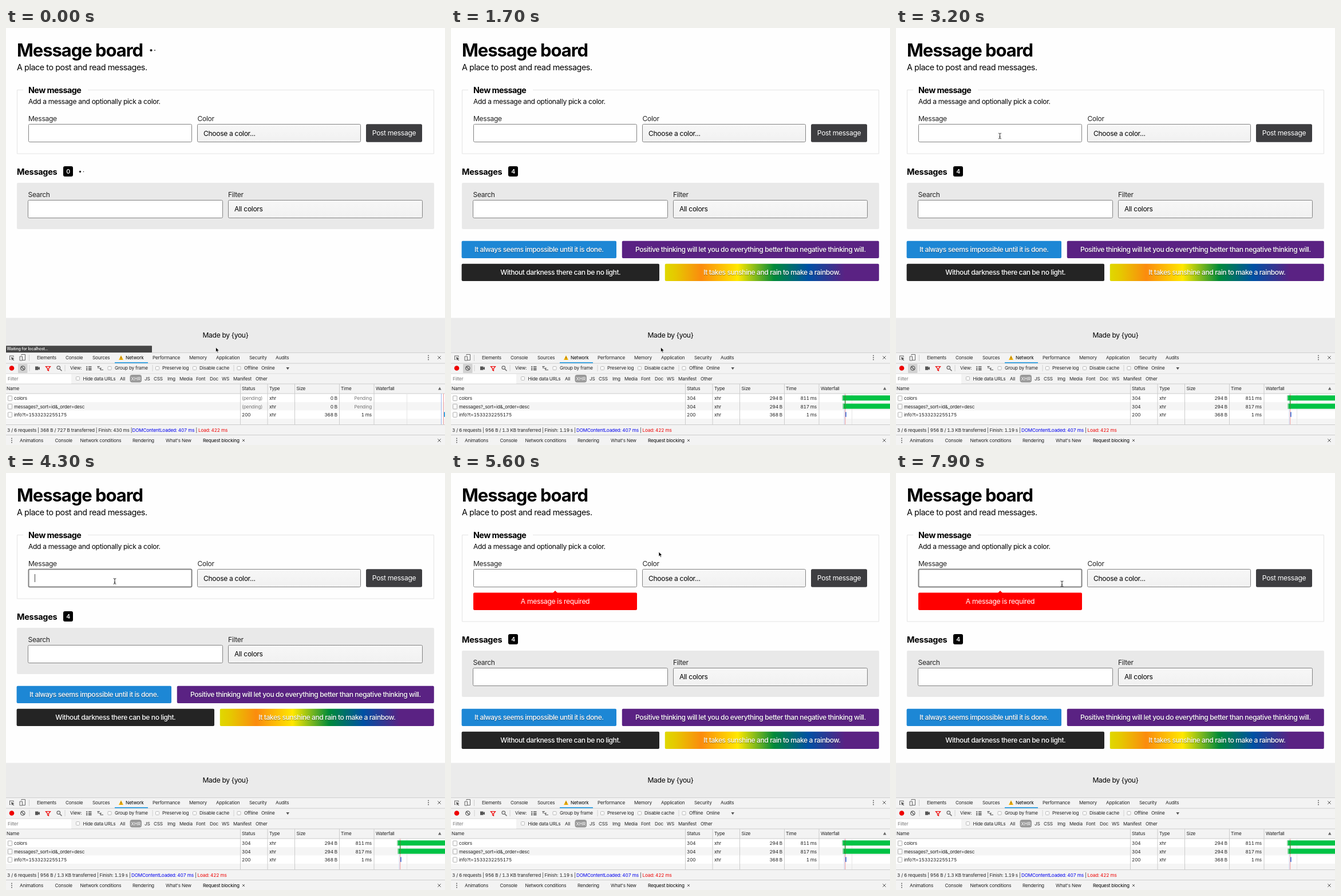
An HTML page that plays this animation: 767 by 730 pixels, repeating every 8000 ms.

```html
<!DOCTYPE html>
<html lang="en">
<head>
<meta charset="utf-8">
<title>Message board</title>
<style>
  html, body { margin: 0; width: 100%; height: 100%; overflow: hidden; background: #fefefe; }
  svg { display: block; width: 767px; height: 730px; }
  text { font-family: Inter, "Open Sans", sans-serif; font-optical-sizing: none; font-size: 12.1px; letter-spacing: -.027em; fill: #000; white-space: pre; }
  .label { fill: #222; }
  .chip { fill: #fff; font-weight: 500; letter-spacing: -.036em; text-shadow: 0 1px 1px rgba(0, 0, 0, .4); }
  .dev { font-size: 8.2px; letter-spacing: -.022em; font-variant-numeric: tabular-nums; fill: #222; }
  .white { fill: #fff; }
  .gray { fill: #777; }
  .dark { fill: #000; }
  .hide { display: none; }
</style>
</head>
<body>
<svg id="stage" viewBox="0 0 767 730" xmlns="http://www.w3.org/2000/svg"></svg>
<script>
const LOOP = 8000, STEP = 100;
const LOADED = 700, FOCUS_1 = 3900, BLUR = 5500, FOCUS_2 = 7200;

// Pointer stops: time, x, y
const PATH = [
  [0, 366.5, 559], [2100, 366.5, 559], [2900, 181.5, 189], [3300, 181.5, 189],
  [3700, 190, 189.5], [4600, 190, 189.5], [5200, 363, 138], [5900, 363, 138],
  [6600, 290, 194], [LOOP, 290, 194]
];

// Markup helpers
const rect = (x, y, w, h, fill, more = '') => `<rect x="${x}" y="${y}" width="${w}" height="${h}" fill="${fill}" ${more}/>`;
const text = (x, y, s, cls = '', more = '') => `<text x="${x}" y="${y}" class="${cls}" ${more}>${s.replace(/&/g, '&amp;')}</text>`;
const dev = (x, y, s, cls = '', more = '') => text(x, y, s, 'dev ' + cls, more);
const mid = (x, y, s, cls = '') => text(x, y, s, cls, 'text-anchor="middle"');
const line = (d, color, width = 1, more = '') => `<path d="${d}" fill="none" stroke="${color}" stroke-width="${width}" ${more}/>`;
const shape = (d, fill, more = '') => `<path d="${d}" fill="${fill}" ${more}/>`;
const dot = (x, y, r, fill, more = '') => `<circle cx="${x}" cy="${y}" r="${r}" fill="${fill}" ${more}/>`;
const group = (id, body, cls = '') => `<g id="${id}" class="${cls}">${body}</g>`;
const field = (x, y, w, fill = '#fff', id = '') => rect(x, y, w, 31, fill, `rx="2" stroke="#828282" ${id && `id="${id}"`}`);
const check = (x, y) => rect(x - 3, y - 3, 6, 6, '#fdfdfd', 'rx="1" stroke="#aaa" stroke-width=".8"');
const cross = (x, y, r = 2.7) => line(`M${x - r} ${y - r}l${2 * r} ${2 * r}m0 ${-2 * r}l${-2 * r} ${2 * r}`, '#555');
const kebab = (x, y) => [-3.5, 0, 3.5].map(d => dot(x, y + d, .9, '#555')).join('');
const hline = (y, color = '#ccc') => line(`M0 ${y}H767`, color);
const labels = (y, list) => list.map(([x, s]) => dev(x, y, s)).join('');
const loader = (x, y, gap, name) => [0, 1, 2].map(i => dot(x + i * gap, y, 0, '#222', `class="${name}"`)).join('');

function boardTop() {
  return text(19, 50, 'Message board', '', 'style="font-size:31px;font-weight:700;letter-spacing:-.034em"')
    + text(19, 74, 'A place to post and read messages.', '', 'style="font-size:14.3px;letter-spacing:-.029em"')
    + line('', '#e4e4e4', 1, 'id="frame"')
    + text(39, 114, 'New message', '', 'style="font-size:14.3px;font-weight:700;letter-spacing:-.038em"')
    + text(39, 132.7, 'Add a message and optionally pick a color.')
    + text(39, 163, 'Message', 'label') + text(334.5, 163, 'Color', 'label')
    + field(39.5, 168.5, 285, '#fff', 'entry')
    + line('M50.5 177V191', '#444', 1, 'id="caret"')
    + field(334.5, 168.5, 285, 'url(#soft)') + text(345, 188.5, 'Choose a color...')
    + rect(629, 168.3, 98, 31.4, '#3d3d40', 'rx="2.5"') + mid(678, 188.3, 'Post message', 'white')
    + group('error', shape('M177.5 210.5L182 206L186.5 210.5Z', '#f00')
      + rect(39, 209.5, 286, 30.5, '#f00', 'rx="2"') + mid(182, 229.3, 'A message is required', 'white'));
}

function chip(x, y, w, fill, s) {
  return rect(x, y, w, 30.2, fill, 'rx="2"') + mid(x + w / 2, y + 19.2, s, 'chip');
}

function boardList() {
  return text(19, 256.7, 'Messages', '', 'style="font-size:14.5px;font-weight:700;letter-spacing:-.02em"')
    + rect(100, 242, 17, 18, '#000', 'rx="3"')
    + '<text id="count" x="108.5" y="254.8" class="white" text-anchor="middle" style="font-size:10.5px;font-weight:600"></text>'
    + rect(19, 271, 729, 81, '#e9e9e9', 'rx="2"')
    + text(38.5, 295.7, 'Search', 'label') + text(388, 295.7, 'Filter', 'label')
    + field(38.5, 301.5, 340) + field(388.5, 301.5, 339, 'url(#soft)') + text(399, 321.4, 'All colors')
    + group('chips', chip(18.6, 372.7, 270.4, '#1d87d5', 'It always seems impossible until it is done.')
      + chip(298.8, 372.7, 449, '#5a2283', 'Positive thinking will let you do everything better than negative thinking will.')
      + chip(18.6, 412.7, 345.4, '#242424', 'Without darkness there can be no light.')
      + chip(373.8, 412.7, 374, 'url(#rainbow)', 'It takes sunshine and rain to make a rainbow.'));
}

function tabs() {
  return rect(0, 568, 767, 162, '#f3f3f3') + hline(568.5, '#d0d0d0') + hline(587, '#ccc')
    + shape('M6 573.5H13.5V576H12.5V574.5H7V580H8V581H6Z', '#666') + shape('M9 576L14.5 578.2L12.2 579.3L14.2 581.4L13.3 582.2L11.3 580.2L10.2 582Z', '#555')
    + line('M27 573V571.5H33.5V581.5H29', '#666') + line('M24 575H28.5V582H24Z', '#666') + line('M40.5 572V583', '#ccc')
    + labels(580.3, [[54, 'Elements'], [104, 'Console'], [151, 'Sources'], [256, 'Performance'], [320, 'Memory'], [367, 'Application'], [425, 'Security'], [471, 'Audits']])
    + shape('M201 573L205 581H197Z', '#f4b400') + line('M201 575.5V578M201 579V580', '#533', .9)
    + dev(209, 580.3, 'Network', 'dark') + rect(190, 585, 58, 1.8, '#2f9fe0')
    + kebab(738, 577) + cross(757, 577);
}

function tools() {
  const seps = [41, 103, 256, 398].map(x => `M${x} 590V601`).join('');
  return hline(605, '#ddd') + hline(623, '#ccc') + line(seps, '#d0d0d0')
    + dot(10, 595.5, 4.3, '#e00')
    + rect(21, 588, 16.5, 16, '#d2d2d2', 'id="held" rx="1"')
    + dot(29.3, 595.5, 3.7, 'none', 'stroke="#555" stroke-width="1.2"') + line('M26.8 593L31.8 598', '#555', 1.2)
    + shape('M51 592.5H56.5V594.5L59 593V598.5L56.5 597V598.8H51Z', '#555')
    + line('M69.5 592.5H77.5L74.5 596V600L72.5 598.8V596Z', '#e00', 1.2)
    + dot(91.8, 594.6, 2.8, 'none', 'stroke="#666" stroke-width="1.2"') + line('M94 597L97.5 600.3', '#666', 1.5)
    + dev(112, 598.4, 'View:')
    + line('M140 593H142.5M140 595.7H142.5M140 598.4H142.5M144 593H149.5M144 595.7H149.5M144 598.4H149.5', '#555', 1.6)
    + line('M159.5 592.5H164M162.5 595.5H167M165.5 598.5H170M161 592V596M165 595V599', '#555', 1.2)
    + [181, 264.5, 329.5, 407].map(x => check(x, 595.5)).join('')
    + labels(598.4, [[190, 'Group by frame'], [273, 'Preserve log'], [338, 'Disable cache'], [416, 'Offline'], [446, 'Online']])
    + shape('M489.5 594H495L492.2 598.2Z', '#555')
    + rect(0, 606, 114, 16.5, '#fff') + dev(3, 617, 'Filter', 'gray') + check(125.5, 613.5)
    + rect(216.5, 607, 20.5, 13.5, '#999', 'rx="4"') + dev(226.8, 616.8, 'XHR', 'white', 'text-anchor="middle"')
    + labels(616.8, [[134.5, 'Hide data URLs'], [199, 'All'], [242, 'JS'], [258, 'CSS'], [282, 'Img'], [303, 'Media'], [332, 'Font'], [356, 'Doc'], [377, 'WS'], [397, 'Manifest'], [436, 'Other']]);
}

function cells(rows) {
  return rows.map(([status, size, time], i) => {
    const y = 651.2 + i * 14.4, tone = status === '(pending)' ? 'gray' : '';
    return dev(412, y, status, tone) + dev(460, y, 'xhr')
      + dev(579, y, size, '', 'text-anchor="end"') + dev(639, y, time, tone, 'text-anchor="end"');
  }).join('');
}

function summary(head, x, load, sep) {
  return dev(2, 707, head) + dev(x, 707, 'DOMContentLoaded: 407 ms', '', 'style="fill:#00e"')
    + dev(sep, 707, '|') + dev(load, 707, 'Load: 422 ms', '', 'style="fill:#e00"');
}

function table() {
  const names = ['colors', 'messages?_sort=id&_order=desc', 'info?t=1533232255175'];
  const info = ['200', '368 B', '1 ms'], wait = ['(pending)', '0 B', 'Pending'];
  return rect(0, 640, 767, 54, '#fff') + rect(0, 655, 767, 14.4, '#f5f5f5') + rect(0, 684, 767, 10, '#f5f5f5')
    + hline(640, '#ccc')
    + labels(634, [[1, 'Name'], [412, 'Status'], [460, 'Type'], [507.5, 'Size'], [585, 'Time'], [646, 'Waterfall']])
    + shape('M755 633.5H760.5L757.8 628.5Z', '#666')
    + line([409.5, 457, 504.5, 582.5, 643].map(x => `M${x} 623V694`).join(''), '#ccc')
    + line('M700.5 640V694', '#e6e6e6')
    + names.map((s, i) => rect(3.5, 644 + i * 14.4, 7, 8.5, '#fff', 'rx=".8" stroke="#999" stroke-width=".8"') + dev(14, 651.2 + i * 14.4, s)).join('')
    + group('pending', cells([wait, wait, info])
      + line('M760.5 640V694', '#9db8f0') + line('M764.5 640V694', '#f09a9a') + rect(765.3, 672.3, 2, 8.5, '#1a9be0')
      + summary('3 / 6 requests | 368 B / 727 B transferred | Finish: 430 ms |', 220.5, 336, 331.5))
    + group('done', cells([['304', '294 B', '811 ms'], ['304', '294 B', '817 ms'], info])
      + line('M687 640V694', '#c8d4f4') + line('M688.7 640V694', '#f3b4b4', 1.4)
      + rect(683.5, 643.2, 84, 9, '#00c345') + rect(684.5, 657.6, 83, 9, '#00c345')
      + rect(683.5, 643.2, 1.5, 9, '#9ccfa8') + rect(684.5, 657.6, 1.5, 9, '#9ccfa8')
      + line('M688.7 643V667', '#3e9a3a', 1.4) + rect(689, 672.3, 1.7, 8.5, '#3f6fd8')
      + summary('3 / 6 requests | 956 B / 1.3 KB transferred | Finish: 1.19 s |', 219, 334.5, 330))
    + hline(694.5, '#ccc') + hline(712.5, '#ccc');
}

function drawer() {
  return kebab(10, 722)
    + labels(725.3, [[24, 'Animations'], [85.5, 'Console'], [129.5, 'Network conditions'], [221, 'Rendering'], [279, "What's New"]])
    + dev(344, 725.3, 'Request blocking', 'dark') + cross(415, 722, 2) + cross(757, 722);
}

const stops = [[0, '#dfd800'], [.05, '#e6c800'], [.17, '#fb8b0e'], [.34, '#ffe800'], [.51, '#008a3a'], [.67, '#0050a4'], [.84, '#5a2283']];
const stage = document.getElementById('stage');
stage.innerHTML = `<defs>
  <linearGradient id="rainbow">${stops.map(([o, c]) => `<stop offset="${o}" stop-color="${c}"/>`).join('')}</linearGradient>
  <linearGradient id="soft" x2="0" y2="1"><stop stop-color="#f7f7f7"/><stop offset="1" stop-color="#f1f1f1"/></linearGradient>
  </defs>`
  + rect(0, 0, 767, 730, '#fefefe') + rect(0, 507.5, 767, 61, '#ebebeb')
  + mid(383.5, 541.7, 'Made by {you}')
  + boardTop() + group('list', boardList())
  + loader(253.5, 39, 6.5, 'big') + loader(129.5, 251.5, 6, 'small')
  + group('bubble', rect(0, 556.3, 255, 12, '#454545', 'rx="1"')
    + dev(1.5, 564.3, 'Waiting for localhost...', 'white', 'style="font-size:7.1px;font-weight:500"'))
  + tabs() + tools() + table() + drawer()
  + group('arrow', shape('M0 0V8.2L1.9 6.5L3.2 9.4L4.6 8.8L3.3 5.9H5.9Z', '#000', 'stroke="#fff" stroke-width=".7"'))
  + group('beam', line('M-2.3 -4.8Q0 -4.8 0 -3.5Q0 -4.8 2.3 -4.8M0 -3.5V3.5M-2.3 4.8Q0 4.8 0 3.5Q0 4.8 2.3 4.8M-1.2 1.8H1.2', '#222'));

const el = id => document.getElementById(id);
const show = (id, on) => el(id).classList.toggle('hide', !on);
const ease = p => p * p * (3 - 2 * p);

function pointer(t) {
  const i = PATH.findIndex(p => p[0] > t), [t0, x0, y0] = PATH[i - 1], [t1, x1, y1] = PATH[i];
  const p = ease((t - t0) / (t1 - t0));
  return [x0 + (x1 - x0) * p, y0 + (y1 - y0) * p];
}

function pulse(name, size, t) {
  document.querySelectorAll('.' + name).forEach((c, i) => {
    const wave = Math.sin(2 * Math.PI * (t / 1000 + .24 - i * .17));
    c.setAttribute('r', t < LOADED ? size * Math.max(0, wave) : 0);
  });
}

function draw(t) {
  const loaded = t >= LOADED, failed = t >= BLUR;
  const since = t >= FOCUS_2 ? t - FOCUS_2 : t >= FOCUS_1 && t < BLUR ? t - FOCUS_1 : -1;
  const focused = since >= 0;

  show('bubble', !loaded);
  show('pending', !loaded);
  show('done', loaded);
  show('chips', loaded);
  el('count').textContent = loaded ? 4 : 0;
  pulse('big', 2.1, t);
  pulse('small', 1.7, t);

  show('held', t < FOCUS_1);
  show('caret', focused && since % 1000 < 500);
  el('entry').setAttribute('stroke-width', focused ? 2 : 1);

  show('error', failed);
  el('list').setAttribute('transform', `translate(0 ${failed ? 40 : 0})`);
  el('frame').setAttribute('d', `M30 108.5H19.5V${failed ? 260 : 220}H747.5V108.5H143`);

  const [x, y] = pointer(t);
  const inEntry = x > 39 && x < 325 && y > 168 && y < 200;
  show('beam', inEntry);
  show('arrow', !inEntry);
  el(inEntry ? 'beam' : 'arrow').setAttribute('transform', `translate(${x} ${y})`);
}

function tick() {
  draw(Math.floor(performance.now() % LOOP / STEP) * STEP);
  requestAnimationFrame(tick);
}
tick();
</script>
</body>
</html>
```
